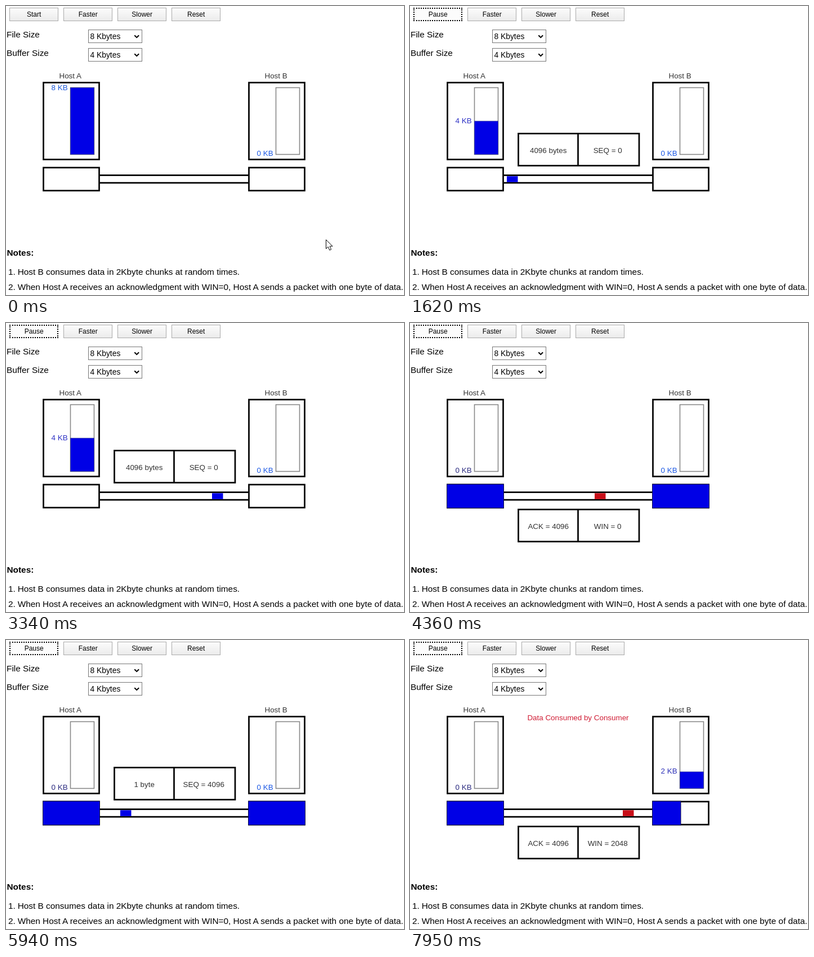
These frames come from a looping animation (707x515 px, 8000 ms). An HTML page:

```html
<!DOCTYPE html>
<html>
<head>
<meta charset="utf-8">
<style>
  html, body { margin: 0; width: 100%; height: 100%; overflow: hidden; background: #fff; }
  svg { display: block; font-family: Arial, "Liberation Sans", sans-serif; }
  .page { font-size: 15.36px; }
  .button { font-size: 12px; text-anchor: middle; }
  .focus { box-sizing: border-box; height: 24px; border: 2px dotted #000; background: #fcfcfc; }
  .select { font-size: 13.8px; }
  .label { font-size: 13.4px; fill: #333; }
  .mid { text-anchor: middle; }
  .line { fill: none; stroke: #000; stroke-width: 2.7; }
</style>
</head>
<body>
<svg id="stage" width="707" height="515" viewBox="0 0 707 515"></svg>
<script>
const LOOP = 8000, BLUE = '#0000e6', RED = '#c80e18';
const stage = document.getElementById('stage');

// Packet steps come in runs of 16, about 50 ms apart.
const RUNS = [1620, 2430, 3280, 4110, 4930, 5740, 6560, 7380];
const LOAD = 820, CONSUME = 6700;
const TRIPS = [
  { from: 0, cells: ['4096 bytes', 'SEQ = 0'], path: [[0, 172], [15, 261], [31, 355], [33, 366], [39, 401]] },
  { from: 40, ack: true, cells: ['ACK = 4096', 'WIN = 0'], path: [[40, 404], [47, 363], [53, 328], [63, 268], [79, 176]] },
  { from: 80, cells: ['1 byte', 'SEQ = 4096'], path: [[80, 174], [84, 203], [102, 311], [117, 400]] },
  { from: 118, ack: true, cells: ['ACK = 4096', 'WIN = 2048'], path: [[118, 407], [123, 378]] }
];

const rect = (x, y, w, h, rest) => `<rect x="${x}" y="${y}" width="${w}" height="${h}" ${rest}/>`;
const text = (x, y, cls, str, rest = '') => `<text x="${x}" y="${y}" class="${cls}" ${rest}>${str}</text>`;

function along(path, k) {
  let i = 1;
  while (i < path.length - 1 && k > path[i][0]) i++;
  const [k0, x0] = path[i - 1], [k1, x1] = path[i];
  return x0 + (x1 - x0) * (k - k0) / (k1 - k0);
}

function stepAt(t) {
  const run = RUNS.filter(r => r <= t).length - 1;
  return run < 0 ? -1 : run * 16 + Math.min(15, Math.floor((t - RUNS[run]) / 50));
}

function button(i, name, focused) {
  const x = 6 + i * 96;
  const box = focused
    ? `<foreignObject x="${x}" y="3" width="87" height="24"><div class="focus"></div></foreignObject>`
    : rect(x + .5, 3.5, 86, 23, 'fill="url(#face)" stroke="#aaa"');
  return box + text(x + 43.7, 19, 'button', name);
}

function select(y, name, value) {
  return text(1, y + 14, 'page', name) +
    rect(146.5, y + .5, 95, 23, 'fill="#fff" stroke="#767676"') +
    text(149.6, y + 17, 'select', value) +
    `<path d="M228.3 ${y + 10.3}l3.9 3.9 3.9-3.9" fill="none" stroke="#000" stroke-width="2"/>`;
}

// fill: share of the transfer buffer in use
function host(x, name, kb, color, fill) {
  const height = kb * 14.9, top = 264.3 - height;
  return text(x + 29.5, 129.2, 'label', name) +
    rect(x + 1.5, 136.5, 99, 137, 'class="line"') +
    rect(x + 49.5, 145.5, 42, 119, 'fill="#fff" stroke="#888" stroke-width="1.6"') +
    (kb ? rect(x + 49.5, top + .4, 42, height - .3, `fill="${BLUE}" stroke="#33398a" stroke-width=".7"`) : '') +
    text(x + 15.6, top + 3 + kb / 4, 'label', kb + ' KB', `style="fill:${color}"`) +
    rect(x + 1.5, 288, 99, 41, 'class="line"') +
    (fill ? rect(x + .5, 287.2, 101 * fill, 42.6, `fill="${BLUE}" stroke="#101040"`) : '');
}

function packetBox(trip) {
  const y = trip.ack ? 332.3 : 227.3;
  return rect(192.5, y, 214.5, 57.2, 'class="line"') +
    `<path class="line" d="M298.5 ${y}v57"/>` +
    text(245.7, y + 35, 'label mid', trip.cells[0]) +
    text(351.2, y + 35, 'label mid', trip.cells[1]);
}

function cursor(t) {
  const p = Math.floor(t / 50) / 15;
  return `<path transform="translate(${140 * p} ${-40 * p})" d="M568.5 416.5v16l3.7-3.4 2.6 6 2.9-1.2-2.6-5.8h5z" fill="#fff" stroke="#000"/>`;
}

const fixed = `<defs><linearGradient id="face" x2="0" y2="1">
  <stop stop-color="#fcfcfc"/><stop offset="1" stop-color="#ebebeb"/></linearGradient></defs>` +
  ['Faster', 'Slower', 'Reset'].map((name, i) => button(i + 1, name)).join('') +
  select(42, 'File Size', '8 Kbytes') + select(75, 'Buffer Size', '4 Kbytes') +
  '<path class="line" d="M166 301.7H431M166 315.2H431"/>' +
  text(1.5, 445, 'page', 'Notes:', 'font-weight="bold"') +
  text(4, 479, 'page', '1.') +
  text(20.7, 479, 'page', 'Host B consumes data in 2Kbyte chunks at random times.') +
  text(4, 506, 'page', '2.') +
  text(20.7, 506, 'page', 'When Host A receives an acknowledgment with WIN=0, Host A sends a packet with one byte of data.');

function draw(t) {
  const k = stepAt(t), loaded = t >= LOAD, consumed = t >= CONSUME, arrived = k >= 40;
  const trip = loaded && TRIPS.filter(p => p.from <= Math.max(k, 0)).pop();
  let out = fixed + button(0, loaded ? 'Pause' : 'Start', loaded);

  const kbA = arrived ? 0 : loaded ? 4 : 8;
  const colorA = { 8: '#1c58d8', 4: '#2c30c4', 0: '#2c2c80' }[kbA];
  const fullA = arrived || (loaded && k < 0);
  out += host(65, 'Host A', kbA, colorA, fullA ? 1 : 0);
  out += host(430, 'Host B', consumed ? 2 : 0, consumed ? '#2c30b8' : '#1c58e4', !arrived ? 0 : consumed ? .5 : 1);

  if (trip) out += packetBox(trip);
  if (k >= 0) {
    out += rect(along(trip.path, k).toFixed(1), 303.3, 19.5, 10.6, `fill="${trip.ack ? RED : BLUE}"`);
  }
  if (consumed) out += text(298.5, 142.7, 'label mid', 'Data Consumed by Consumer', 'style="fill:#d01c34"');
  if (!loaded) out += cursor(t);
  stage.innerHTML = out;
}

function tick() {
  draw(performance.now() % LOOP);
  requestAnimationFrame(tick);
}
tick();
</script>
</body>
</html>
```
